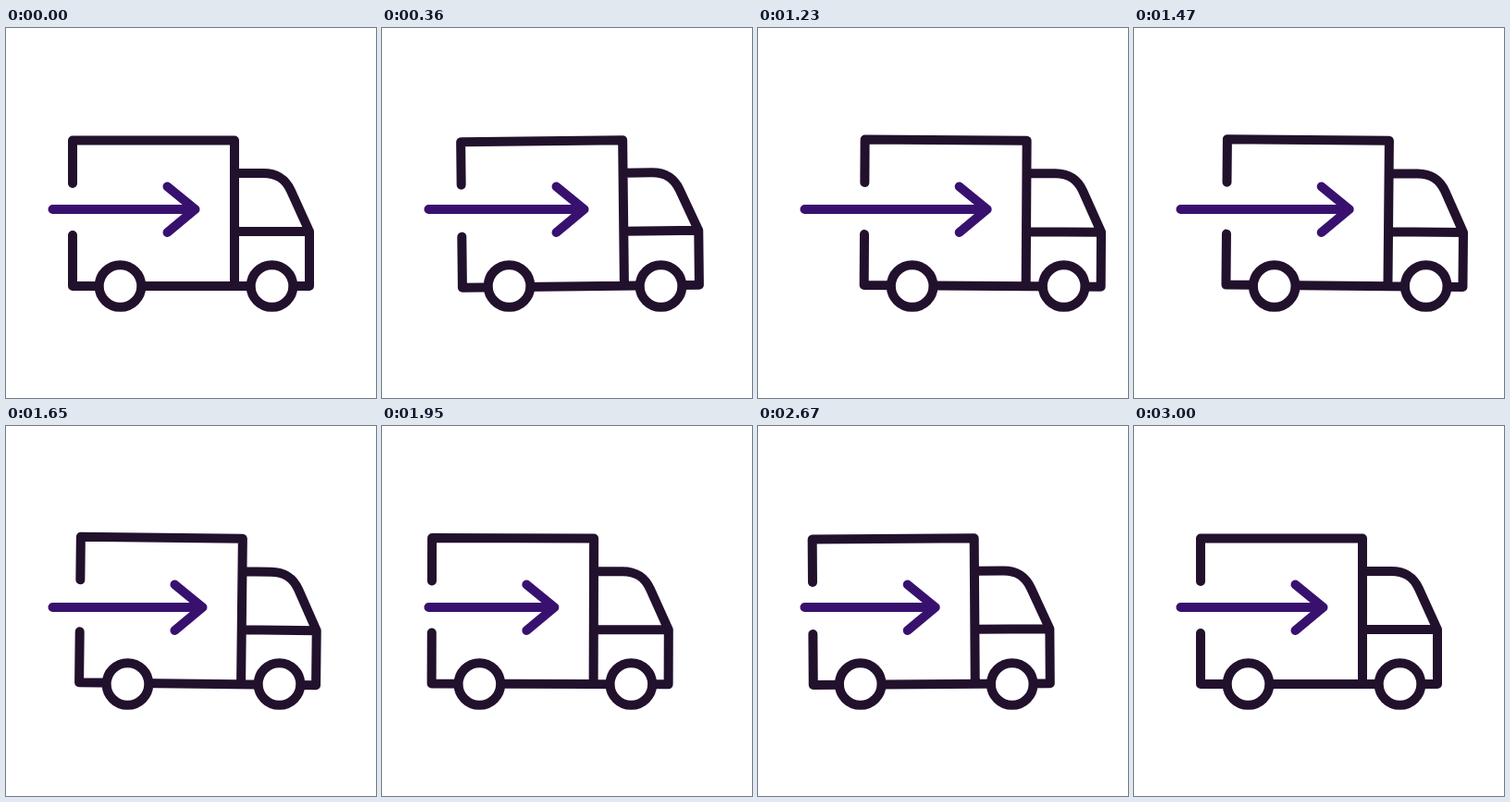
These frames come from a looping animation (400x400 px, 5.09 s). An HTML page:

```html
<!DOCTYPE html>
<html lang="en">
<head>
<meta charset="utf-8">
<title>Delivery truck</title>
<style>
  html, body { margin: 0; width: 100%; height: 100%; overflow: hidden; background: #fff; }
  svg { display: block; width: 100%; height: 100%; }
  g, path { stroke-width: 10; stroke-linecap: round; stroke-linejoin: round; fill: none; }
  .dark { stroke: #22112d; }
  #wheels { fill: #fff; }
  #arrow { stroke: #38116f; }
</style>
</head>
<body>
<svg viewBox="0 0 400 400">
  <g id="body" class="dark">
    <path d="M72 168V121.5H247V279M72 224V279H328V220L308 176C302 163 293 157 278 157H247M247 220H328"/>
  </g>
  <g id="wheels" class="dark">
    <circle cx="123.5" cy="279" r="22.8"/>
    <circle cx="287.5" cy="279" r="22.8"/>
  </g>
  <path id="arrow"/>
</svg>
<script>
const LOOP = 5090, STEP = 30, MOVE_END = 3000;
const [body, wheels, arrow] = ['body', 'wheels', 'arrow'].map(id => document.getElementById(id));

// Each key: time in ms, value, easing handles (x1, x2) of the leg that leads to it.
const driveKeys = [[0, 0], [890, 48.5, .58, .42], [2360, -26.5, .58, .42], [MOVE_END, 0, .58, .36]];
const tiltKeys = [[0, 0], [360, -.65], [750, .35], [1230, .35], [1650, .65], [2400, -.7], [MOVE_END, 0]];

function ease(x, x1 = 1 / 3, x2 = 2 / 3) {
  let low = 0, high = 1, u = .5;
  for (let i = 0; i < 20; i++) {
    u = (low + high) / 2;
    const v = 1 - u;
    if (3 * x1 * u * v * v + 3 * x2 * u * u * v + u ** 3 < x) low = u;
    else high = u;
  }
  return u * u * (3 - 2 * u);
}

function valueAt(keys, t) {
  const i = keys.findIndex(key => key[0] > t);
  if (i < 0) return keys.at(-1)[1];
  const [t0, v0] = keys[i - 1], [t1, v1, x1, x2] = keys[i];
  return v0 + (v1 - v0) * ease((t - t0) / (t1 - t0), x1, x2);
}

function draw(now) {
  const t = Math.floor(now % LOOP / STEP) * STEP;
  const dx = valueAt(driveKeys, t), tip = 204.5 + dx;
  body.setAttribute('transform', `translate(${dx} 0) rotate(${valueAt(tiltKeys, t)} 220 200)`);
  wheels.setAttribute('transform', `translate(${dx} 0)`);
  arrow.setAttribute('d', `M50.5 196H${tip}M${tip - 30} 171.5L${tip} 196L${tip - 30} 221`);
}

let start;
function tick(now) {
  start ??= now;
  draw(now - start);
  requestAnimationFrame(tick);
}
draw(0);
requestAnimationFrame(tick);
</script>
</body>
</html>
```
